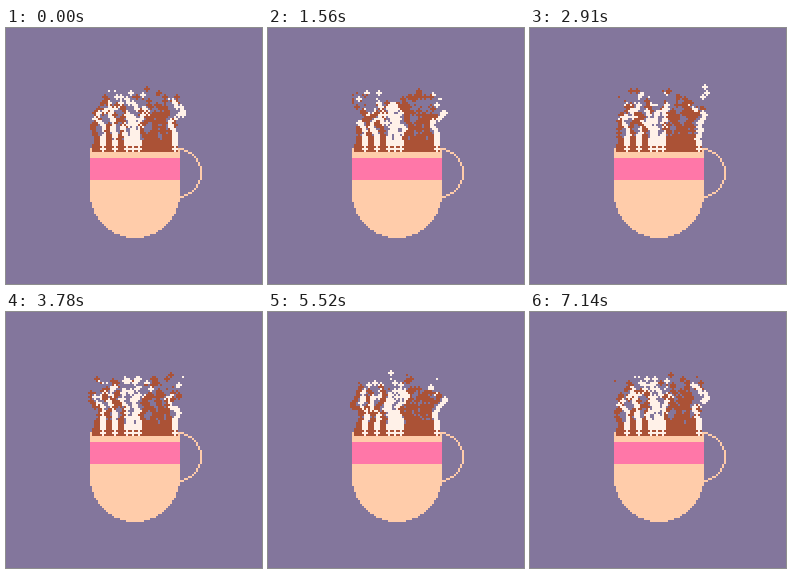
Write an HTML page with a canvas that moves like this. It is 256 by 256 pixels and loops after 7170 ms.

```html
<!DOCTYPE html>
<html lang="en">
<head>
<meta charset="utf-8">
<title>Hot cocoa</title>
<style>
html, body { margin: 0; width: 100%; height: 100%; overflow: hidden; background: #83769c; }
canvas { display: block; width: 100vw; height: 100vh; image-rendering: pixelated; }
</style>
</head>
<body>
<canvas id="stage" width="128" height="128"></canvas>
<script>
const ctx = document.getElementById('stage').getContext('2d');
const BG = '#83769c', PEACH = '#ffccaa', PINK = '#ff77a8', BROWN = '#ab5236', WHITE = '#fff1e8';
const STEP = 30, FRAMES = 239, MAX_AGE = 32, TAU = Math.PI * 2;
const TOP = 57;

// One jet every three pixels along the rim; w is white, b is brown.
const jets = [...'bwbwbwwwbbbbbw'].map((c, i) => ({
  x: 45 + i * 3,
  color: c === 'w' ? WHITE : BROWN
}));

function rect(x, y, w, h, color) {
  ctx.fillStyle = color;
  ctx.fillRect(x, y, w, h);
}

function plus(x, y, color) {
  rect(x - 1, y, 3, 1, color);
  rect(x, y - 1, 1, 3, color);
}

function disc(cx, cy, r, color) {
  for (let dy = -r; dy <= r; dy++) {
    const half = Math.floor(Math.sqrt((r + 0.45) ** 2 - dy * dy));
    rect(cx - half, cy + dy, half * 2 + 1, 1, color);
  }
}

function ring(cx, cy, r, color) {
  for (let a = 0; a <= r * Math.SQRT1_2 + 0.5; a++) {
    const b = Math.round(Math.sqrt(r * r - a * a));
    for (const [x, y] of [[a, b], [b, a]]) {
      for (const sx of [-1, 1]) {
        for (const sy of [-1, 1]) rect(cx + sx * x, cy + sy * y, 1, 1, color);
      }
    }
  }
}

function rand(jet, born, salt) {
  let n = Math.imul(jet + 1, 374761393) ^ Math.imul(born + 7, 668265263) ^ Math.imul(salt, 974634767);
  n = Math.imul(n ^ (n >>> 15), 2246822519);
  n = Math.imul(n ^ (n >>> 13), 3266489917);
  return ((n ^ (n >>> 16)) >>> 0) / 4294967296;
}

// Smooth noise that closes over one loop.
function sway(jet, born, salt) {
  const t = TAU * born / FRAMES;
  return 0.6 * Math.sin(t * (11 + (jet * 5 + salt) % 7) + jet * 2.4 + salt) +
         0.4 * Math.sin(t * (23 + (jet * 3 + salt) % 9) + jet * 4.1 + salt * 2);
}

function drop(jet, frame, age) {
  const born = (frame - age + FRAMES) % FRAMES;
  const life = 20 + 5 * sway(jet, born, 3) + 6 * (rand(jet, born, 1) - 0.5);
  if (age > life) return;
  const k = age / 20;
  const drift = 7 * sway(jet, born, 1) + 2 * (rand(jet, born, 2) - 0.5);
  const x = Math.max(42, Math.min(88, Math.round(jets[jet].x + drift * k)));
  const y = Math.round(TOP - age * (1 + 0.15 * rand(jet, born, 4)));
  const color = jets[jet].color;
  if (age > life * 0.8 && rand(jet, born, 5) < 0.5) rect(x, y, 1, 1, color);
  else plus(x, y, color);
}

function mug() {
  ring(85, 72, 12, PEACH);
  disc(64, 82, 22, PEACH);
  rect(42, 60, 45, 23, PEACH);
  rect(42, 65, 45, 11, PINK);
}

function base() {
  rect(43, 58, 43, 4, BROWN);
  for (const { x, color } of jets) {
    plus(x, 58, color);
    plus(x, 60, color);
  }
}

function draw(frame) {
  rect(0, 0, 128, 128, BG);
  mug();
  base();
  for (let age = MAX_AGE; age >= 0; age--) {
    for (let jet = 0; jet < jets.length; jet++) drop(jet, frame, age);
  }
}

const start = performance.now();
function tick() {
  draw(Math.floor((performance.now() - start) / STEP) % FRAMES);
  requestAnimationFrame(tick);
}
tick();
</script>
</body>
</html>
```
